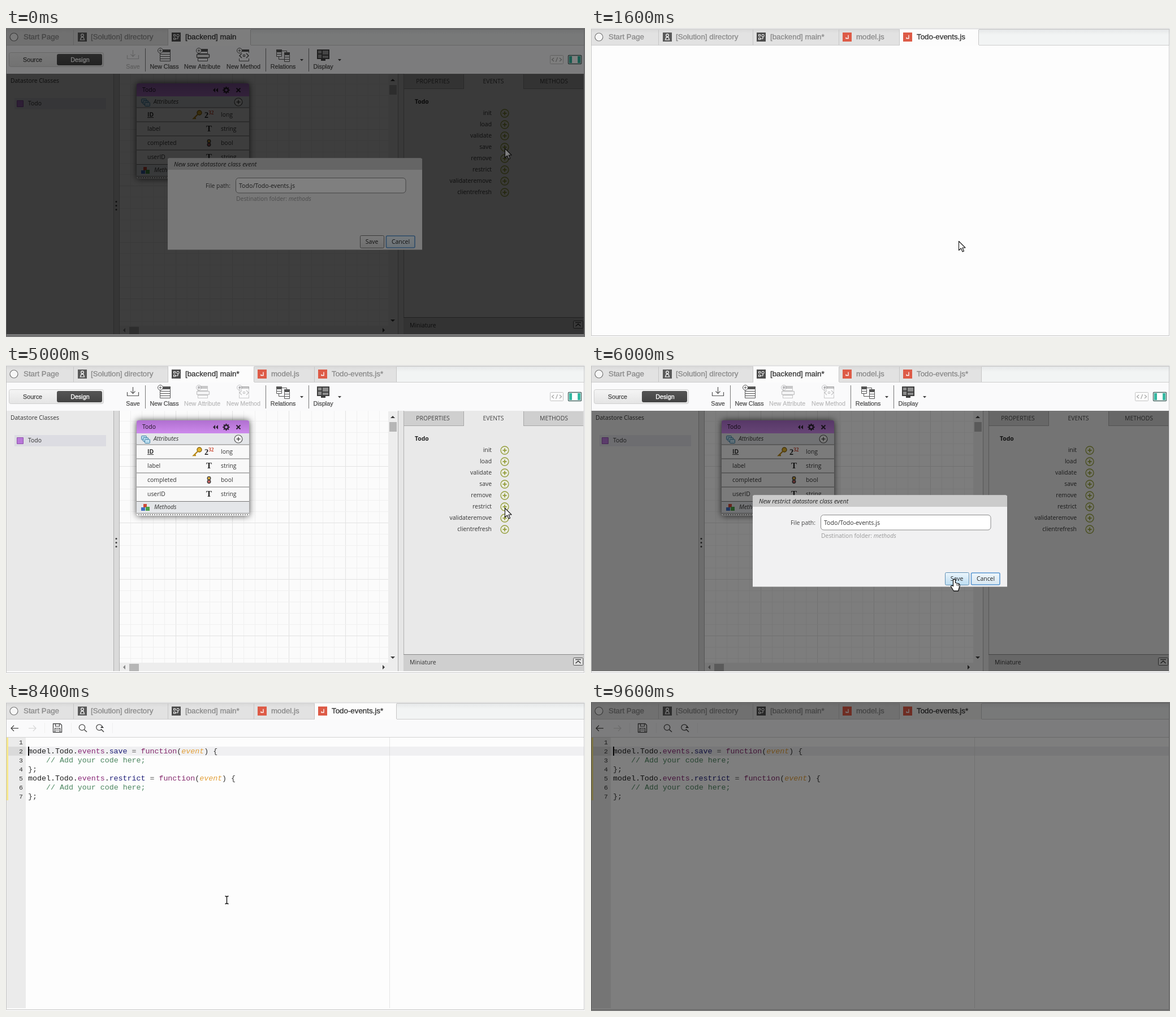
Write an HTML page with a canvas that moves like this. It is 1024 by 547 pixels and loops after 9.8 s.

```html
<!DOCTYPE html>
<html lang="en">
<head>
<meta charset="utf-8">
<title>Datastore class events</title>
<style>
html, body { margin: 0; width: 100%; height: 100%; overflow: hidden; background: #fff; }
canvas { display: block; }
</style>
</head>
<body>
<canvas id="stage" width="1024" height="547"></canvas>
<script>
const c = document.getElementById('stage').getContext('2d');
const LOOP = 9800, STEP = 200, BOTTOM = 542;
const ARIAL = '"Liberation Sans", Arial, sans-serif';
const UI = '"Open Sans", "Noto Sans", sans-serif';
const MONO = '"Liberation Mono", "Courier New", monospace';
const SERIF = '"Liberation Serif", serif';

// ---------- helpers ----------
function rect(x, y, w, h, fill) {
  c.fillStyle = fill;
  c.fillRect(x, y, w, h);
}
function grad(y0, y1, a, b) {
  const g = c.createLinearGradient(0, y0, 0, y1);
  g.addColorStop(0, a);
  g.addColorStop(1, b);
  return g;
}
function box(x, y, w, h, r, fill, line, lw = 1) {
  c.beginPath();
  c.roundRect(x, y, w, h, r);
  if (fill) { c.fillStyle = fill; c.fill(); }
  if (line) { c.strokeStyle = line; c.lineWidth = lw; c.stroke(); }
}
function disc(x, y, r, fill, line, lw = 1) {
  box(x - r, y - r, 2 * r, 2 * r, r, fill, line, lw);
}
function path(pts, line, lw = 1, fill, close) {
  c.beginPath();
  for (let i = 0; i < pts.length; i += 2) c.lineTo(pts[i], pts[i + 1]);
  if (close) c.closePath();
  if (fill) { c.fillStyle = fill; c.fill(); }
  if (line) { c.strokeStyle = line; c.lineWidth = lw; c.stroke(); }
}
// y is the middle of the line; bold adds a hairline for a medium weight
function text(s, x, y, size, fam, color, { style = '', align = 'left', bold = 0 } = {}) {
  c.font = `${style} ${size}px ${fam}`;
  c.textAlign = align;
  c.fillStyle = color;
  const base = Math.round(y + size * 0.33);
  c.fillText(s, x, base);
  if (bold) {
    c.strokeStyle = color;
    c.lineWidth = bold;
    c.strokeText(s, x, base);
  }
  return c.measureText(s).width;
}
const ui = (s, x, y, color = '#333', opt) => text(s, x, y, 10.4, UI, color, opt);
const plus = (x, y, r, color, lw = 1) => {
  path([x - r, y, x + r, y], color, lw);
  path([x, y - r, x, y + r], color, lw);
};

// ---------- tabs ----------
function fileIcon(x) {
  rect(x, 8, 16, 16, '#dd5b47');
  path([x + 10, 12.5, x + 10, 18.5, x + 6, 18.5, x + 6, 16.5], '#fff', 1.3);
}
function personIcon(x) {
  rect(x, 8, 16, 16, '#5a5a5a');
  disc(x + 8, 13, 2.3, null, '#fff', 1.2);
  path([x + 4.5, 21, x + 6, 16.5, x + 10, 16.5, x + 11.5, 21], '#fff', 1.2, null, true);
}
function modelIcon(x) {
  rect(x, 8, 16, 16, '#4e4e4e');
  box(x + 3.5, 11.5, 3, 3, 0, null, '#fff');
  box(x + 3.5, 17.5, 3, 3, 0, null, '#fff');
  disc(x + 11, 13.5, 2.2, null, '#fff');
  path([x + 6.5, 19, x + 11, 19, x + 11, 16], '#fff');
}
function tabs(s) {
  rect(0, 0, 1024, 31, grad(1, 12, '#e3e5e6', '#f2f4f4'));
  rect(0, 0, 1024, 1, '#f4f4f4');
  rect(0, 1, 1023, 2, '#cfcfcf');
  rect(0, 30, 1023, 1, '#cdcdcd');
  const list = [[0, 120, 'Start Page'], [120, 287, '[Solution] directory'],
    [287, s.files ? 439 : 433, '[backend] main' + (s.edited ? '*' : '')]];
  if (s.files) {
    list.push([439, 546, 'model.js']);
    list.push([546, s.starred ? 691 : 686, 'Todo-events.js' + (s.starred ? '*' : '')]);
  }
  list.forEach(([a, b, name], i) => {
    const on = i === s.tab;
    rect(a, 2, b - a, on ? 29 : 28, on ? s.tabColor : grad(2, 9, '#d8d8d8', '#e2e2e2'));
    rect(b - 1, 3, 1, 27, '#c6c6c6');
    text(name, a + 30 + (i === 0), 16, 13.33, ARIAL, on ? '#383838' : '#8b8b8b', { bold: 0.35 });
    if (i === 0) disc(14, 16, 7, '#f6f6f6', '#777', 1.2);
    if (i === 1) personIcon(127);
    if (i === 2) modelIcon(293);
    if (i > 2) fileIcon(a + 6);
  });
  if (s.closeMark) {
    box(421, 11, 12, 12, 2, '#c9c9c9');
    path([424.5, 14.5, 429.5, 19.5], '#fff', 1.6);
    path([429.5, 14.5, 424.5, 19.5], '#fff', 1.6);
  }
}

// ---------- design toolbar ----------
function tool(name, x, off, draw) {
  c.globalAlpha = off ? 0.3 : 1;
  text(name, x, 68, 10.7, ARIAL, '#4a4a4a', { align: 'center', bold: 0.25 });
  draw(x);
  c.globalAlpha = 1;
}
function badge(x) {
  disc(x, 40, 4.5, '#fafafb', '#555');
  plus(x, 40, 2.3, '#555');
}
function tableIcon(x, y, w, rows) {
  rect(x, y, w, 4, '#555');
  for (let i = 0; i < rows; i++) box(x + .5, y + 4.5 + i * 4, w - 1, 4, 0, null, '#555');
}
function dropMark(x) {
  path([x - 3, 55, x + 3, 55, x, 58.5], null, 1, '#444', true);
}
function designBar(s) {
  rect(0, 31, 1023, 50, '#fafafb');
  box(5.5, 43.5, 167, 25, 3, grad(43, 69, '#f5f5f5', '#e4e4e4'), '#cfcfcf');
  box(90, 46, 80, 20, 3, grad(46, 66, '#555', '#434343'));
  text('Source', 47, 56, 10.7, ARIAL, '#444', { align: 'center', bold: 0.25 });
  text('Design', 131, 56, 10.7, ARIAL, '#fff', { align: 'center', bold: 0.35 });
  tool('Save', 224.5, !s.edited, x => {
    path([x - 10, 48, x - 10, 54.5, x + 10, 54.5, x + 10, 48], '#555', 1.2);
    path([x, 39, x, 50], '#555', 1.2);
    path([x - 4, 46.5, x, 50.5, x + 4, 46.5], '#555', 1.2);
  });
  tool('New Class', 280, false, x => {
    tableIcon(x - 8, 38, 19, 4);
    badge(x - 7);
  });
  tool('New Attribute', 347, s.noClass, x => {
    tableIcon(x - 8, 37, 18, 1);
    box(x - 9.5, 46.5, 22, 6, 1, '#eee', '#555', 1.4);
    box(x - 7.5, 53.5, 17, 5, 0, null, '#555');
    badge(x - 6);
  });
  tool('New Method', 420, s.noClass, x => {
    box(x - 7.5, 38.5, 17, 20, 0, null, '#555');
    rect(x - 8, 38, 18, 4, '#555');
    rect(x - 9, 44, 21, 10, '#fafafb');
    path([x - 3, 45, x - 7, 49, x - 3, 53], '#444', 1.3);
    path([x + 5, 45, x + 9, 49, x + 5, 53], '#444', 1.3);
    box(x - .5, 47.5, 3, 3, 0, null, '#444');
    badge(x - 7);
  });
  tool('Relations', 490, false, x => {
    tableIcon(x - 12, 38, 10, 2);
    tableIcon(x + 2, 43, 10, 3);
    path([x - 7.5, 51, x - 7.5, 55.5, x + 2, 55.5], '#555');
    path([x - 2, 40.5, x + 6.5, 40.5, x + 6.5, 43], '#555');
  });
  tool('Display', 561, false, x => {
    rect(x - 11, 38, 22, 17, '#3e3e3e');
    for (const [a, b, w, h] of [[-9, 40, 6, 5], [-9, 47, 6, 6], [-1, 40, 10, 7], [-1, 49, 10, 4]])
      rect(x + a, b, w, h, '#8c8c8c');
    rect(x - 4, 55, 8, 3, '#3e3e3e');
  });
  dropMark(523);
  dropMark(590);
  for (const x of [246, 459, 535]) rect(x, 36, 1, 41, '#777');
  const mark = s.hazy ? '#dedede' : '#a5a5a5';
  box(962.5, 48.5, 23, 15, 1, '#fbfbfb', s.hazy ? '#eee' : '#c4c4c4');
  path([969, 53, 965.5, 56, 969, 59], mark, 1.2);
  path([979, 53, 982.5, 56, 979, 59], mark, 1.2);
  path([975.5, 52, 972.5, 60], mark, 1.2);
  box(994.5, 48.5, 23, 15, 1, '#fff', '#4a6a66', 1.4);
  rect(996, 50, 5, 12, '#35b8a2');
  rect(1011, 50, 5, 12, '#35b8a2');
}

// ---------- design view ----------
function grid() {
  rect(200, 81, 493, BOTTOM - 81, '#fbfbfb');
  for (let x = 220; x < 676; x += 20) rect(x, 81, 1, 446, x % 100 ? '#f0f0f0' : '#e2e2e2');
  for (let y = 99; y < 527; y += 20) rect(201, y, 475, 1, y % 100 === 79 ? '#e2e2e2' : '#f0f0f0');
}
function scrollbars() {
  rect(676, 82, 17, 445, '#ededed');
  rect(201, 527, 492, 15, '#ededed');
  rect(678, 101, 13, 17, '#b6b6b6');
  rect(218, 529, 17, 13, '#b6b6b6');
  const m = '#3c3c3c';
  path([680, 94, 688, 94, 684, 90], null, 1, m, true);
  path([680, 516, 688, 516, 684, 520], null, 1, m, true);
  path([211, 531, 211, 539, 207, 535], null, 1, '#888', true);
  path([666, 531, 666, 539, 670, 535], null, 1, m, true);
}
function classBox() {
  c.save();
  c.shadowColor = 'rgba(0,0,0,.75)';
  c.shadowBlur = 12;
  box(231, 98, 199, 169, 3, '#f8f8f8');
  c.restore();
  box(231, 98, 199, 23, [3, 3, 0, 0], grad(98, 121, '#b070d0', '#cd8aec'));
  ui('Todo', 241, 110, '#1c1220');
  path([370, 106, 366, 110, 370, 114], null, 1, '#2d2333', true);
  path([375, 106, 371, 110, 375, 114], null, 1, '#2d2333', true);
  disc(389.5, 110, 3.5, null, '#2d2333', 2.4);
  for (let i = 0; i < 8; i++) {
    const a = i * Math.PI / 4, u = Math.cos(a), v = Math.sin(a);
    path([389.5 + 4 * u, 110 + 4 * v, 389.5 + 6.2 * u, 110 + 6.2 * v], '#2d2333', 2);
  }
  path([407.5, 106.5, 414.5, 113.5], '#2d2333', 2);
  path([414.5, 106.5, 407.5, 113.5], '#2d2333', 2);

  rect(231, 121, 199, 19, '#e4e6e9');
  for (let i = 0; i < 3; i++) box(239.5 + i * 3, 125.5 + i * 3, 9, 7, 1, '#b9dcee', '#3d7fa4');
  ui('Attributes', 261, 131, '#333', { style: 'italic' });
  disc(411, 131, 7, '#f4f4f4', '#555', 1.2);
  plus(411, 131, 3.5, '#444', 1.4);

  [['ID', 'long'], ['label', 'string'], ['completed', 'bool'], ['userID', 'string']].forEach(([name, type], i) => {
    const y = 153.5 + i * 25;
    rect(231, y - 13, 199, 1, '#777');
    const w = ui(name, 250, y, '#333', { style: i ? '' : 'bold' });
    if (!i) rect(250, 158, w, 1, '#333');
    ui(type, 380, y);
    if (type === 'string') text('T', 359, y, 15, SERIF, '#222', { style: 'bold', align: 'center' });
  });
  disc(342, 150, 4, '#e3b52c', '#8a6512', 1.4);
  path([339, 153, 332, 160, 336, 160], '#b98a1c', 2.4);
  text('2', 351, 154, 14, SERIF, '#222', { style: 'bold' });
  text('32', 358, 150, 9.5, SERIF, '#c8402a', { style: 'bold' });
  disc(359, 200.5, 2.8, '#e2b240', '#3a3a3a', 1.3);
  disc(359, 206.5, 2.8, '#c66', '#3a3a3a', 1.3);

  rect(231, 241, 199, 21, '#e4e6e9');
  rect(231, 241, 199, 1, '#777');
  rect(243, 246, 6, 6, '#d04a3a');
  rect(239, 252, 7, 6, '#3f6fc0');
  rect(247, 251, 7, 7, '#48a048');
  ui('Methods', 262, 252, '#333', { style: 'italic' });
  rect(231, 262, 199, 1, '#888');
  for (let x = 234; x < 428; x += 4) rect(x, 264, 2, 2, '#888');
}
function sidePanel() {
  rect(693, 81, 10, BOTTOM - 81, '#e6e6e6');
  rect(693, 81, 1, BOTTOM - 81, '#b0b0b0');
  rect(703, 81, 319, BOTTOM - 81, '#e9e9e9');
  rect(703, 81, 1, BOTTOM - 81, '#b0b0b0');
  [['PROPERTIES', 704, 755], ['EVENTS', 810, 862], ['METHODS', 916, 969]].forEach(([name, x, mid], i) => {
    if (i !== 1) {
      rect(x, 82, 105, 26, '#cfcfcf');
      rect(x, 107, 105, 1, '#a8a8a8');
    }
    ui(name, mid, 94.5, '#444', { align: 'center' });
  });
  rect(809, 82, 1, 26, '#a8a8a8');
  rect(915, 82, 1, 26, '#a8a8a8');
  ui('Todo', 723, 131, '#222', { style: 'bold' });
  ['init', 'load', 'validate', 'save', 'remove', 'restrict', 'validateremove', 'clientrefresh'].forEach((name, i) => {
    const y = 151 + 20 * i;
    ui(name, 859, y, '#333', { align: 'right' });
    disc(882, y, 7, '#eaebe0', '#939d3c', 1.3);
    plus(882, y, 3.5, '#939d3c', 1.8);
  });
  rect(703, 512, 319, 1, '#888');
  rect(703, 513, 319, 29, '#cfcfcf');
  ui('Miniature', 714, 527);
  box(1003.5, 518.5, 17, 13, 1, '#e2e2e2', '#555');
  path([1007, 521.5, 1017, 521.5], '#333', 1.2);
  path([1007.5, 528, 1012, 524, 1016.5, 528], '#333', 1.4);
}
function designView() {
  grid();
  scrollbars();
  rect(1, 81, 190, BOTTOM - 81, '#e9e9e9');
  ui('Datastore Classes', 8, 94);
  rect(15, 124, 162, 20, '#dcdce2');
  box(19.5, 128.5, 11, 11, 0, '#b878d8', '#9050ac');
  ui('Todo', 39, 134);
  rect(190, 81, 10, BOTTOM - 81, '#dadada');
  rect(190, 81, 1, BOTTOM - 81, '#b0b0b0');
  rect(200, 81, 1, BOTTOM - 81, '#b0b0b0');
  for (const y of [308, 315, 322]) disc(195, y - .5, 1.5, '#3a3a3a');
  classBox();
  sidePanel();
}
function dialog(event, hover) {
  rect(0, 81, 1023, BOTTOM - 81, 'rgba(0,0,0,.5)');
  box(286, 230.5, 450, 162, [3, 3, 0, 0], '#f1f1f2');
  box(286, 230.5, 450, 20.5, [3, 3, 0, 0], '#cbcbcb');
  text(`New ${event} datastore class event`, 297, 241.5, 10.8, UI, '#222', { style: 'italic' });
  ui('File path:', 397, 280, '#444', { align: 'right' });
  box(406.5, 265.5, 300.5, 26.5, 5, '#fff', '#8a8a8a');
  text('Todo/Todo-events.js', 412, 280, 10.6, UI, '#333');
  const w = ui('Destination folder: ', 407, 303, '#999');
  ui('methods', 407 + w, 303, '#999', { style: 'italic' });
  box(626.5, 367.5, 42, 22, 2, hover ? grad(368, 390, '#eaf5fc', '#bcdcf0') : grad(368, 390, '#f6f6f6', '#dcdcdc'),
    hover ? '#5f8fb4' : '#777');
  ui('Save', 647, 379, '#222', { align: 'center' });
  box(672.5, 368, 50.5, 21, 2, grad(368, 390, '#eef6fb', '#d6e6f1'), '#5b98d2', 1.6);
  ui('Cancel', 698, 379, '#222', { align: 'center' });
}

// ---------- code editor ----------
function codeLine(event, y) {
  let x = 39;
  for (const [s, color, style] of [['model.Todo.', '#1d1d1d'], ['events', '#8a2a78'], ['.', '#1d1d1d'],
    [event, '#1e1e78'], [' = ', '#555'], ['function', '#84286c'], ['(', '#333'],
    ['event', '#e3a03a', 'italic'], [') {', '#333']])
    x += text(s, x, y, 13.3, MONO, color, { style });
}
function editor(s, top) {
  rect(0, top, 1023, BOTTOM - top, '#fdfdfd');
  rect(1, top, 34, BOTTOM - top, '#ebebeb');
  rect(678, top, 1, BOTTOM - top, '#e6e6e6');
  const first = top > 70 ? 2 : 1, rowY = n => 71 + 16 * (n - 1);
  const edge = rowY(s.lines) + 7;
  rect(1, top, 3, edge - top, '#f7e88a');
  const cy = rowY(s.row) - 8;
  rect(4, cy, 31, 16, '#dadada');
  if (!s.selected) {
    rect(35, cy, 987, 16, '#f0f0f2');
    rect(678, cy, 1, 16, '#e0e0e0');
  } else {
    for (let n = s.row; n <= 7; n++) {
      const x = n === s.row ? 39 + s.col * 8 : 39;
      rect(x, rowY(n) - 8, n === 7 ? 16 : 1022 - x, 16, '#b5d5ff');
    }
  }
  for (let n = first; n <= s.lines; n++) {
    const y = rowY(n);
    text(String(n), 30, y, 11.5, MONO, '#333', { align: 'right' });
    if (n === 2) codeLine('save', y);
    if (n === 5) codeLine('restrict', y);
    if (n === 3 || n === 6) text('// Add your code here;', 71, y, 13.3, MONO, '#4c8660');
    if (n === 4 || n === 7) text('};', 39, y, 13.3, MONO, '#333');
  }
  rect(39 + s.col * 8, cy, 2, 16, '#000');
}
function editorBar() {
  rect(0, 31, 1023, 32, '#fafafb');
  rect(0, 62, 1023, 1, '#d4d4d4');
  const k = '#444';
  path([22, 46.5, 9, 46.5], k, 1.2);
  path([14, 41.5, 9, 46.5, 14, 51.5], k, 1.2);
  path([40, 46.5, 53, 46.5], '#d8d8d8', 1.2);
  path([48, 41.5, 53, 46.5, 48, 51.5], '#d8d8d8', 1.2);
  for (const x of [68, 115, 188]) rect(x, 37, 1, 18, '#f0f0f0');
  path([83.5, 38.5, 96, 38.5, 98.5, 41, 98.5, 53.5, 83.5, 53.5], k, 1.3, null, true);
  box(87.5, 38.5, 7, 4.5, 0, null, k, 1.2);
  box(86.5, 46.5, 9, 7, 0, null, k, 1.2);
  path([88, 49.5, 94, 49.5], k);
  disc(134.5, 45, 5.2, null, k, 1.2);
  path([138.5, 49, 143, 53], k, 1.5);
  c.beginPath();
  c.arc(165, 45, 5.2, 0.8, 5.9);
  c.strokeStyle = k;
  c.lineWidth = 1.2;
  c.stroke();
  path([168, 48, 173, 53], k, 1.5);
  path([167, 46, 173, 46, 170, 42], null, 1, k, true);
}

// ---------- pointer ----------
const TRACK = [[0, 882, 213], [400, 882, 213], [1000, 650, 377], [2400, 650, 377], [3200, 373, 14],
  [3600, 373, 14], [4600, 882, 253], [5200, 882, 253], [5800, 641, 379], [6400, 641, 379],
  [7000, 50, 166], [7200, 50, 166], [7400, 48, 118], [7600, 40, 87], [8000, 40, 87],
  [8400, 390, 350], [8600, 632, 505]];
function pointerAt(t) {
  const i = TRACK.findIndex(p => p[0] > t);
  if (i < 0) return TRACK[TRACK.length - 1].slice(1);
  const [t0, x0, y0] = TRACK[i - 1], [t1, x1, y1] = TRACK[i];
  const u = (t - t0) / (t1 - t0), e = u * u * (3 - 2 * u);
  return [x0 + (x1 - x0) * e, y0 + (y1 - y0) * e];
}
function pointer(x, y, kind) {
  c.save();
  c.translate(Math.round(x) + .5, Math.round(y) + .5);
  c.lineJoin = 'round';
  if (kind === 'beam') {
    path([-3, -7, 0, -6, 3, -7], '#111', 1.4);
    path([0, -6, 0, 6], '#111', 1.4);
    path([-3, 7, 0, 6, 3, 7], '#111', 1.4);
  } else if (kind === 'hand') {
    c.beginPath();
    c.moveTo(-1, 10);
    c.lineTo(-1, 1);
    c.quadraticCurveTo(1, -2, 3, 1);
    c.lineTo(3, 6);
    c.lineTo(8, 7.5);
    c.quadraticCurveTo(11, 8, 10.5, 12);
    c.lineTo(8, 20.5);
    c.lineTo(0, 20.5);
    c.lineTo(-5, 12.5);
    c.quadraticCurveTo(-4, 9, -1, 12);
    c.closePath();
    c.fillStyle = '#fff';
    c.fill();
    c.strokeStyle = '#111';
    c.lineWidth = 1.3;
    c.stroke();
    path([5.5, 8, 5.5, 11], '#111');
    path([8, 9, 8, 12], '#111');
  } else {
    path([0, 0, 0, 16, 4, 12.5, 6.5, 18.5, 9, 17.5, 6.5, 11.5, 11.5, 11.5], '#111', 1.1, '#fff', true);
  }
  c.restore();
}

// ---------- timeline ----------
function stateAt(t) {
  const within = (a, b) => t >= a && t < b;
  const late = t >= 6400;
  const s = {
    design: t < 1600 || within(3600, 6400),
    blank: within(1600, 1800),
    hazy: within(3400, 3600),
    edited: t >= 1400,
    files: t >= 1600,
    starred: t >= 1800,
    noClass: within(3600, 6400),
    closeMark: within(3200, 3800),
    event: t < 1400 ? 'save' : within(5200, 6200) ? 'restrict' : '',
    tabColor: t >= 9400 ? '#efefee' : '#fcfcfc',
    lines: late ? 7 : 4,
    row: late ? 7 : 4,
    col: 2,
    selected: within(7400, 8000),
    fade: t < 200 || t >= 9600 ? 0.5 : 0
  };
  s.tab = s.design || s.hazy ? 2 : 4;
  if (t >= 7400) s.row = 5;
  if (t >= 7600) { s.row = 2; s.col = 0; }
  return s;
}
function draw(t) {
  const s = stateAt(t);
  const [px, py] = pointerAt(t);
  const overSave = px > 626 && px < 669 && py > 366 && py < 392;
  rect(0, 0, 1024, 547, '#fdfdfd');
  if (s.design) {
    designBar(s);
    designView();
    if (s.event) dialog(s.event, overSave);
  } else if (s.hazy) {
    editor(s, 80);
    designBar(s);
  } else if (!s.blank) {
    editor(s, 63);
    editorBar();
  }
  tabs(s);
  rect(0, 2, 1, 543, '#c4c4c4');
  rect(1022, 2, 1, 543, '#c8c8c8');
  rect(0, 544, 1023, 1, '#c8c8c8');
  rect(0, 545, 1024, 2, '#f6f6f6');
  if (t < 8800) {
    const kind = s.event && overSave ? 'hand' : t >= 6600 ? 'beam' : 'arrow';
    pointer(px, py, kind);
  }
  if (s.fade) rect(0, 0, 1024, 547, `rgba(0,0,0,${s.fade})`);
}

let shown = -1;
const start = performance.now();
function tick(now) {
  const t = Math.floor(Math.max(0, now - start) % LOOP / STEP) * STEP;
  if (t !== shown) draw(shown = t);
  requestAnimationFrame(tick);
}
draw(0);
requestAnimationFrame(tick);
</script>
</body>
</html>
```
